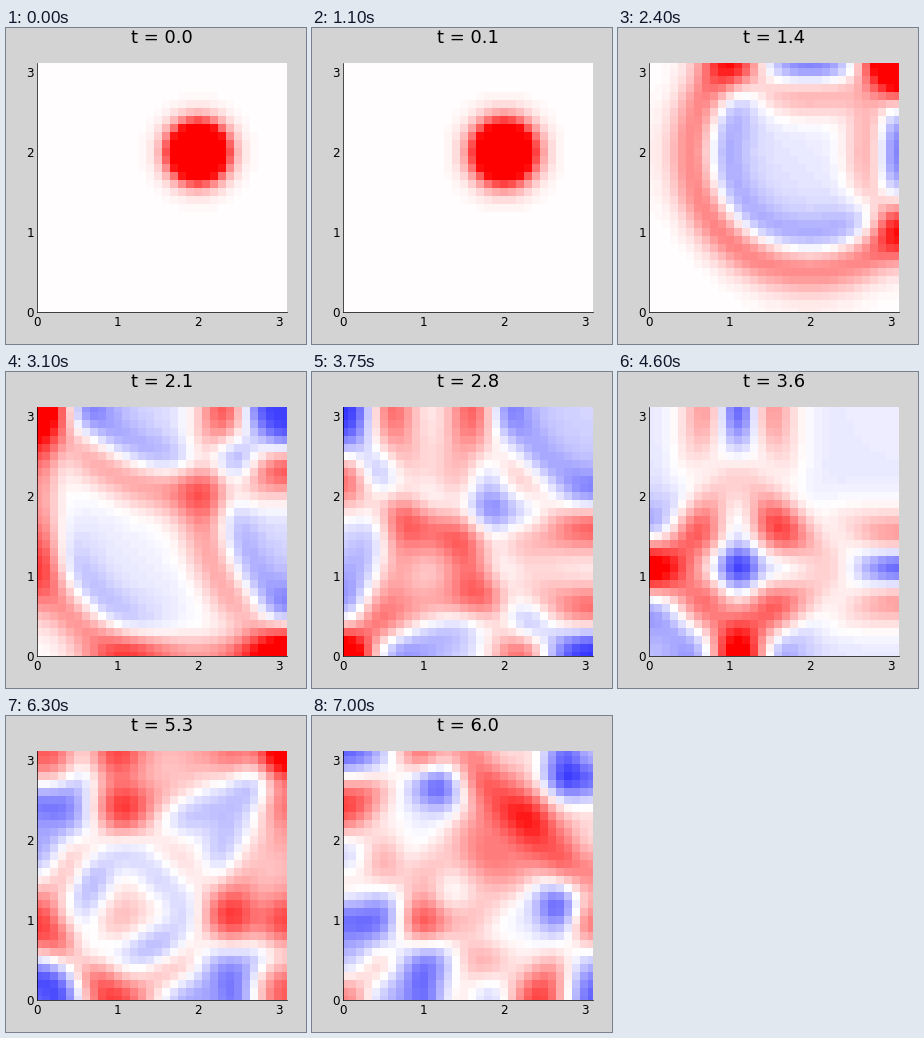
These frames come from a looping animation (300x316 px, 8050 ms). A matplotlib script:

```python
import numpy as np
import matplotlib.pyplot as plt
from matplotlib.animation import FuncAnimation

WIDTH, HEIGHT, DPI = 300, 316, 72
DX, DT, LENGTH, T_END = 0.1, 0.05, 3.1, 6.0
STEPS = round(T_END / DT)
# Rest on the initial state, run the wave, rest on the final state.
SCHEDULE = [0] * 22 + list(range(2, STEPS + 1)) + [STEPS] * 20


def laplacian(u):
    """Five-point Laplacian with reflecting walls."""
    p = np.pad(u, 1, mode="reflect")
    return (p[2:, 1:-1] + p[:-2, 1:-1] + p[1:-1, 2:] + p[1:-1, :-2] - 4 * u) / DX**2


def solve_wave(x):
    xx, yy = np.meshgrid(x, x)
    start = np.exp(-10 * ((xx - 2) ** 2 + (yy - 2) ** 2))
    fields = [start, start + DT**2 / 2 * laplacian(start)]
    while len(fields) <= STEPS:
        fields.append(2 * fields[-1] - fields[-2] + DT**2 * laplacian(fields[-1]))
    return fields


grid = np.arange(0, LENGTH + DX / 2, DX)
edges = np.append(grid, grid[-1] + DX) - DX / 2
fields = solve_wave(grid)

plt.rcParams["font.family"] = "DejaVu Sans"
fig = plt.figure(figsize=(WIDTH / DPI, HEIGHT / DPI), dpi=DPI, facecolor="lightgray")
ax = fig.add_axes([31.49 / WIDTH, 31.51 / HEIGHT, 249.02 / WIDTH, 249 / HEIGHT])
mesh = ax.pcolormesh(edges, edges, fields[0], cmap=plt.get_cmap("bwr", 128),
                     vmin=-0.3, vmax=0.3, antialiased=False)
ax.set(xlim=(0, LENGTH), ylim=(0, LENGTH), xticks=range(4), yticks=range(4))
ax.tick_params(length=0, pad=3.5, labelsize=12)
ax.spines[["top", "right"]].set_visible(False)
ax.spines[["left", "bottom"]].set_linewidth(0.7)
title = fig.text(156 / WIDTH, 301 / HEIGHT, "", size=18, ha="center", va="baseline")


def update(frame):
    step = SCHEDULE[frame]
    mesh.set_array(fields[step])
    title.set_text(f"t = {round(step * DT * 10) / 10:.1f}")
    return mesh, title


anim = FuncAnimation(fig, update, frames=len(SCHEDULE), interval=50,
                     repeat=True, repeat_delay=0)
plt.show()
```
